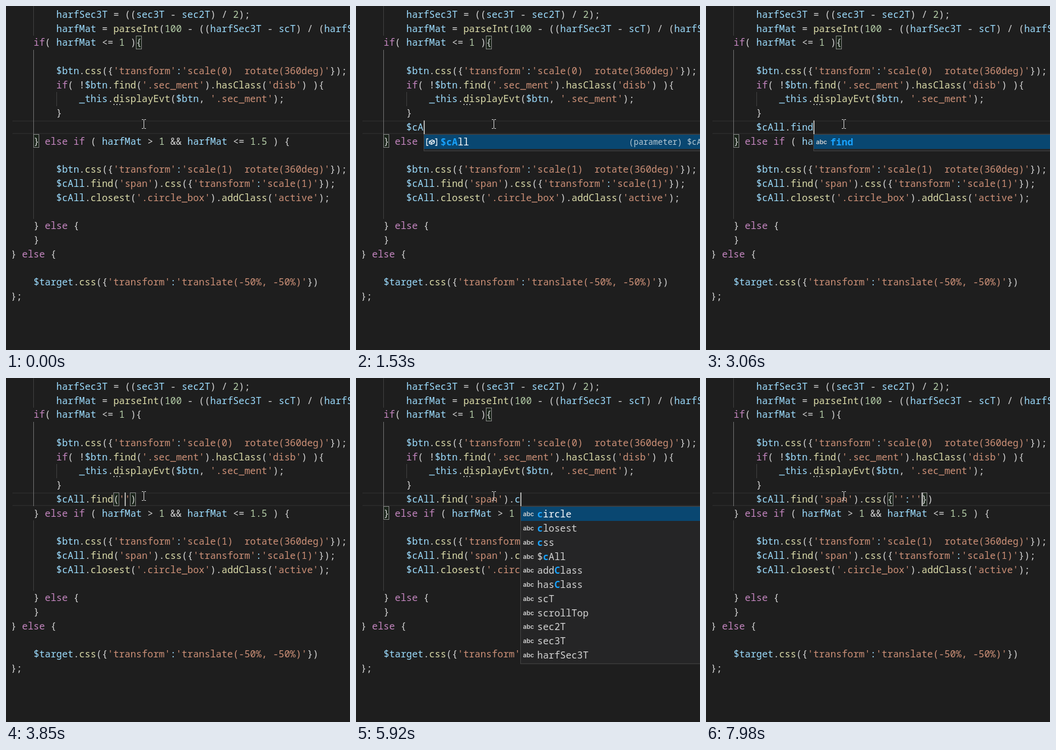
Animation, 580 px wide and 580 px high, one loop 8 s. Source, as an HTML page:

```html
<!DOCTYPE html>
<html lang="en">
<head>
<meta charset="utf-8">
<title>Code editor typing</title>
<style>
html, body { margin: 0; width: 100%; height: 100%; overflow: hidden; background: #1e1e1e; }
svg { display: block; width: 580px; height: 580px; }
text { white-space: pre; font: 500 16.03px "Noto Sans Mono", monospace; fill: #d4d4d4; }
text.detail { font-size: 13.63px; fill: #b5c8d4; }
text.abc { font: 600 10.5px Inter, sans-serif; fill: #d0d0d0; }
.hit { font-weight: 700; fill: #18a3ff; }
</style>
</head>
<body>
<svg viewBox="0 0 580 580">
  <defs><clipPath id="pane"><rect x="11" width="569" height="580"/></clipPath></defs>
  <rect width="580" height="580" fill="#1e1e1e"/>
  <g clip-path="url(#pane)">
    <path d="M11 194H580M11 215H580" stroke="#282828" stroke-width="2"/>
    <g id="guides"></g>
    <g id="boxes"></g>
    <g id="code"></g>
    <g id="typed"></g>
    <g id="popup"></g>
    <rect id="caret" y="193" width="2" height="23" fill="#aeafad"/>
  </g>
  <path d="M229 191.5H231.5L232.5 192.5L233.5 191.5H236M232.5 192V206M229 206.5H231.5L232.5 205.5L233.5 206.5H236"
    fill="none" stroke="#d8d8d8"/>
</svg>
<script>
const LOOP = 8000, ADV = 9.62, LEFT = 7.9, ROW = 23.75, TOP = 3, LIST_TOP = 216;
const $ = id => document.getElementById(id);
const colX = col => LEFT + col * ADV;
const rowY = row => TOP + row * ROW;
const esc = s => s.replace(/&/g, '&amp;').replace(/</g, '&lt;').replace(/>/g, '&gt;');
const rect = (x, y, w, h, attrs) => `<rect x="${x}" y="${y}" width="${w}" height="${h}" ${attrs}/>`;

const lines = [
  [0, 8, "harfSec3T = ((sec3T - sec2T) / 2);"],
  [1, 8, "harfMat = parseInt(100 - ((harfSec3T - scT) / (harfSec3T"],
  [2, 4, "if( harfMat <= 1 ){"],
  [4, 8, "$btn.css({'transform':'scale(0)  rotate(360deg)'});"],
  [5, 8, "if( !$btn.find('.sec_ment').hasClass('disb') ){"],
  [6, 12, "_this.displayEvt($btn, '.sec_ment');"],
  [7, 8, "}"],
  [9, 4, "} else if ( harfMat > 1 && harfMat <= 1.5 ) {"],
  [11, 8, "$btn.css({'transform':'scale(1)  rotate(360deg)'});"],
  [12, 8, "$cAll.find('span').css({'transform':'scale(1)'});"],
  [13, 8, "$cAll.closest('.circle_box').addClass('active');"],
  [15, 4, "} else {"],
  [16, 4, "}"],
  [17, 0, "} else {"],
  [19, 4, "$target.css({'transform':'translate(-50%, -50%)'})"],
  [20, 0, "};"]
];

const TOKEN = /('[^']*'?)|(\b(?:if|else)\b)|([$\w]*[$A-Za-z_][$\w]*(?=\())|([$A-Za-z_][$\w]*|:)|(\d+(?:\.\d+)?)/g;
const COLORS = ['#ce9178', '#c586c0', '#dcdcaa', '#9cdcfe', '#b5cea8'];

function paint(src) {
  let out = '', at = 0;
  for (const m of src.matchAll(TOKEN)) {
    const kind = m.slice(1).findIndex(g => g !== undefined);
    out += esc(src.slice(at, m.index)) + `<tspan fill="${COLORS[kind]}">${esc(m[0])}</tspan>`;
    at = m.index + m[0].length;
  }
  return out + esc(src.slice(at));
}

const codeLine = (row, col, src) =>
  `<text x="${colX(col)}" y="${Math.round(rowY(row) + 16.9)}">${paint(src)}</text>`;

const box = (row, col) =>
  rect(Math.floor(colX(col)) + .5, Math.floor(rowY(row)) + .5, 9, 22, 'fill="#006400" fill-opacity=".1" stroke="#888"');

const vars = ['$btn', '$cAll', '$target', '$wrap'];
const words = ['$btn', '$cAll', '$target', '_this', 'active', 'addClass', 'circle', 'closest',
  'css', 'disb', 'displayEvt', 'find'];
const weak = ['scT', 'scrollTop', 'sec2T', 'sec3T', 'harfSec3T'];
const classy = ['addClass', 'hasClass'];

// time, typed text, caret column, suggestions, matched bracket columns
const steps = [
  [0, '', -1],
  [340, '', 0],
  [800, '$', 1],
  [870, '$', 1, vars],
  [1140, '$c', 2, ['$cAll']],
  [1530, '$cA', 3, ['$cAll']],
  [1860, '$cAl', 4, ['$cAll']],
  [2000, '$cAll', 5, ['$cAll']],
  [2530, '$cAll.', 6],
  [2590, '$cAll.', 6, words],
  [2790, '$cAll.f', 7, ['find']],
  [2860, '$cAll.fi', 8, ['find']],
  [2990, '$cAll.fin', 9, ['find']],
  [3060, '$cAll.find', 10, ['find']],
  [3260, '$cAll.find()', 11],
  [3320, '$cAll.find()', 12, , [10, 11]],
  [3650, '$cAll.find()', 11, , [10, 11]],
  [3850, "$cAll.find('')", 12, , [10, 13]],
  [3990, "$cAll.find('')", 13, , [10, 13]],
  [4190, "$cAll.find('')", 12, , [10, 13]],
  [4390, "$cAll.find('s')", 13, , [10, 14]],
  [4520, "$cAll.find('sp')", 14, , [10, 15]],
  [4590, "$cAll.find('spa')", 15, , [10, 16]],
  [4720, "$cAll.find('span')", 16, , [10, 17]],
  [5320, "$cAll.find('span')", 18, , [10, 17]],
  [5720, "$cAll.find('span').", 19],
  [5780, "$cAll.find('span').", 19, words],
  [5920, "$cAll.find('span').c", 20, ['circle', 'closest', 'css', '$cAll', ...classy, ...weak]],
  [6050, "$cAll.find('span').cs", 21, ['css', 'closest', ...classy, ...weak]],
  [6190, "$cAll.find('span').css", 22, ['css', 'closest', ...classy]],
  [6390, "$cAll.find('span').css()", 23],
  [6450, "$cAll.find('span').css()", 24, , [22, 23]],
  [6720, "$cAll.find('span').css()", 23, , [22, 23]],
  [6980, "$cAll.find('span').css({})", 24, , [22, 25]],
  [7250, "$cAll.find('span').css({})", 25, , [23, 24]],
  [7310, "$cAll.find('span').css({})", 24, , [23, 24]],
  [7450, "$cAll.find('span').css({''})", 25, , [23, 26]],
  [7580, "$cAll.find('span').css({''})", 26, , [23, 26]],
  [7780, "$cAll.find('span').css({'':})", 27, , [23, 27]],
  [7910, "$cAll.find('span').css({'':''})", 28, , [23, 29]],
  [7980, "$cAll.find('span').css({'':''})", 29, , [23, 29]]
];

function markHits(word, query) {
  let q = weak.includes(word) ? '' : query.toLowerCase(), out = '';
  for (const ch of word) {
    const hit = q && ch.toLowerCase() === q[0];
    if (hit) q = q.slice(1);
    out += hit ? `<tspan class="hit">${ch}</tspan>` : ch;
  }
  return out;
}

function icon(x, y, isVar) {
  if (!isVar) return `<text class="abc" x="${x + 4.5}" y="${y + 16}">abc</text>`;
  return `<path transform="translate(${x} ${y})" fill="none" stroke="#e8f0f5" stroke-width="1.4"
    d="M8 7H5.2V18H8M19.5 7H22.3V18H19.5M9.5 11.3L14.5 8.8L18.2 10.4V13.8L13.2 16.2L9.5 14.6ZM9.5 11.3L13.2 12.9L18.2 10.4M13.2 12.9V16.2"/>`;
}

function popup(list, query, x) {
  const h = list.length * ROW + 5;
  let out = rect(x + .5, LIST_TOP + .5, 537, h - 1, 'fill="#252526" stroke="#454545"')
    + rect(x + 1, LIST_TOP + 1, 536, 24, 'fill="#094771"');
  list.forEach((word, i) => {
    const y = Math.round(LIST_TOP + 1.3 + i * ROW), isVar = query[0] === '$';
    out += icon(x, y, isVar)
      + `<text x="${x + 28.6}" y="${y + 18}"${i ? '' : ' style="fill:#fff"'}>${markHits(word, query)}</text>`;
    if (isVar && !i) {
      const detail = `(parameter) ${word}: any`;
      out += `<text class="detail" x="${x + 526 - detail.length * 8.18}" y="${y + 17}">${detail}</text>`;
    }
  });
  return out;
}

const guide = (col, y, h, color) => rect(Math.round(colX(col)), y, 1, h, `fill="${color}"`);
$('guides').innerHTML = guide(4, 0, 50, '#404040') + guide(4, 74, 142, '#707070')
  + guide(8, 145, 24, '#404040') + guide(4, 240, 119, '#404040');
$('code').innerHTML = lines.map(l => codeLine(...l)).join('')
  + [182, 187, 192].map(x => rect(x - 1, 165, 2, 2, 'fill="#a0a0a0"')).join('');

let shown = null;
function draw(t) {
  const step = steps.findLast(s => s[0] <= t);
  if (step === shown) return;
  shown = step;
  const [, src, caret, list, pair] = step;
  const x = Math.round(colX(8 + caret));
  $('typed').innerHTML = codeLine(8, 8, src);
  $('boxes').innerHTML = pair ? pair.map(c => box(8, 8 + c)).join('') : box(2, 22) + box(9, 4);
  $('popup').innerHTML = list ? popup(list, src.match(/[$\w]*$/)[0], x) : '';
  $('caret').setAttribute('x', x);
  $('caret').setAttribute('visibility', caret < 0 ? 'hidden' : 'visible');
}

// Counted from page load, so the clock has no start-up lag.
function tick() {
  draw(performance.now() % LOOP);
  requestAnimationFrame(tick);
}
tick();
</script>
</body>
</html>
```
